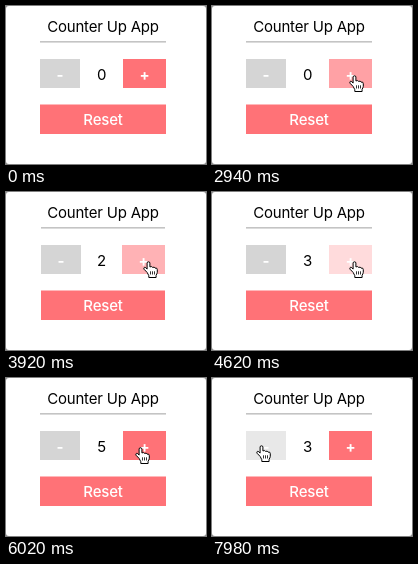
Write an HTML page that moves like this. It is 200 by 158 pixels and loops after 8 s.

```html
<!DOCTYPE html>
<html lang="en">
<head>
<meta charset="utf-8">
<title>Counter Up App</title>
<style>
  html, body { margin: 0; overflow: hidden; background: #8c8c8c; }
  svg { display: block; width: 200px; height: 158px; }
  text { font: 400 15px Inter, sans-serif; letter-spacing: -.2px; text-anchor: middle; }
  .label { font-weight: 500; fill: #fff; }
  .sign { font-weight: 700; fill: #fff; }
  .red { fill: #ff7277; }
  .gray { fill: #d5d5d5; }
</style>
</head>
<body>
<svg viewBox="0 0 200 158">
  <rect width="200" height="158" rx="3" fill="#fff"/>
  <text x="97" y="26">Counter Up App</text>
  <rect id="line" y="35" height="1.6" fill="#c4c4c4"/>
  <g id="minus">
    <rect class="gray" x="34" y="53" width="40" height="29"/>
    <text class="sign" x="54" y="74">-</text>
  </g>
  <text id="count" x="95.6" y="74">0</text>
  <g id="plus">
    <rect class="red" x="117" y="53" width="43" height="29"/>
    <text class="sign" x="138.5" y="74">+</text>
  </g>
  <rect id="reset" class="red" y="98.5" height="29.5"/>
  <text class="label" x="97" y="118.5">Reset</text>

  <path id="arrow" d="M0 0V13.5L3.1 10.7L5.4 16L8 14.9L5.7 9.8H10Z" stroke="#fff"/>
  <g id="hand" fill="#fff" stroke="#000" stroke-linejoin="round">
    <path d="M-1.3 11L-4.4 7.8Q-5.2 6.4-4 5.8Q-2.8 5.6-1.4 7.6V1.6Q-1.4.3 0 .3Q1.4.3 1.4 1.6V5.4Q3.6 4.5 4.1 5.9Q6.1 5.1 6.5 6.6Q8.8 6 8.8 8.2V10.8Q8.5 12.6 7.6 13.8V16H.3V14.2Z"/>
    <path d="M2 9.8V13M4 9.8V13M6 9.8V13" stroke-width=".8"/>
  </g>
</svg>
<script>
const $ = id => document.getElementById(id);
const LOOP = 8000, STEP = 70, CENTER = 97, DIM = 0.2, RELEASE = 95;
const plusClicks = [2940, 3710, 4480, 5110, 5670];
const minusClicks = [7280, 7770];

// Pointer tip: time, x, y
const path = [
  [1960, 171, 98.5], [2590, 142.5, 69.5], [5880, 142.5, 69.5],
  [6020, 134.5, 69.5], [6440, 75, 70.5], [6510, 49.5, 67.5], [LOOP, 49.5, 67.5]
];

const clamp = v => Math.min(1, Math.max(0, v));
const ease = v => v < .5 ? 2 * v * v : 1 - 2 * (1 - v) ** 2;
const released = (clicks, t) => clicks.filter(c => t >= c + RELEASE).length;

// A press dims the button, letting go brings it back.
function opacity(clicks, t) {
  const start = clicks.findLast(c => t >= c);
  if (start === undefined) return 1;
  const age = t - start;
  return age < RELEASE
    ? 1 - (1 - DIM) * ease(clamp((age + 60) / 130))
    : DIM + (1 - DIM) * ease(clamp((age - RELEASE) / 250));
}

function pointer(t) {
  const i = path.findIndex(p => p[0] > t);
  const [t0, x0, y0] = path[i - 1], [t1, x1, y1] = path[i];
  const k = (t - t0) / (t1 - t0), e = i === 1 ? ease(k) : k;
  return [x0 + (x1 - x0) * e, y0 + (y1 - y0) * e];
}

function draw(t) {
  const count = released(plusClicks, t) - released(minusClicks, t);
  // The row is as wide as its digit allows.
  const half = count === 1 ? 61 : count === 2 ? 62 : 63;
  $('count').textContent = count;
  for (const id of ['line', 'reset']) {
    $(id).setAttribute('x', CENTER - half);
    $(id).setAttribute('width', 2 * half);
  }
  $('minus').setAttribute('transform', `translate(${63 - half})`);
  $('plus').setAttribute('transform', `translate(${half - 63})`);
  $('minus').setAttribute('opacity', opacity(minusClicks, t));
  $('plus').setAttribute('opacity', opacity(plusClicks, t));

  const visible = t >= path[0][0];
  const [x, y] = visible ? pointer(t) : [0, 0];
  const overButton = y > 53 && y < 82 &&
    (x > 117 && x < CENTER + half || x > CENTER - half && x < 74);
  $('hand').style.display = visible && overButton ? '' : 'none';
  $('arrow').style.display = visible && !overButton ? '' : 'none';
  for (const id of ['hand', 'arrow']) $(id).setAttribute('transform', `translate(${x} ${y})`);
}

const begin = performance.now();
function tick() {
  const t = (performance.now() - begin) % LOOP;
  draw(Math.floor(t / STEP) * STEP);
  requestAnimationFrame(tick);
}
tick();
</script>
</body>
</html>
```
